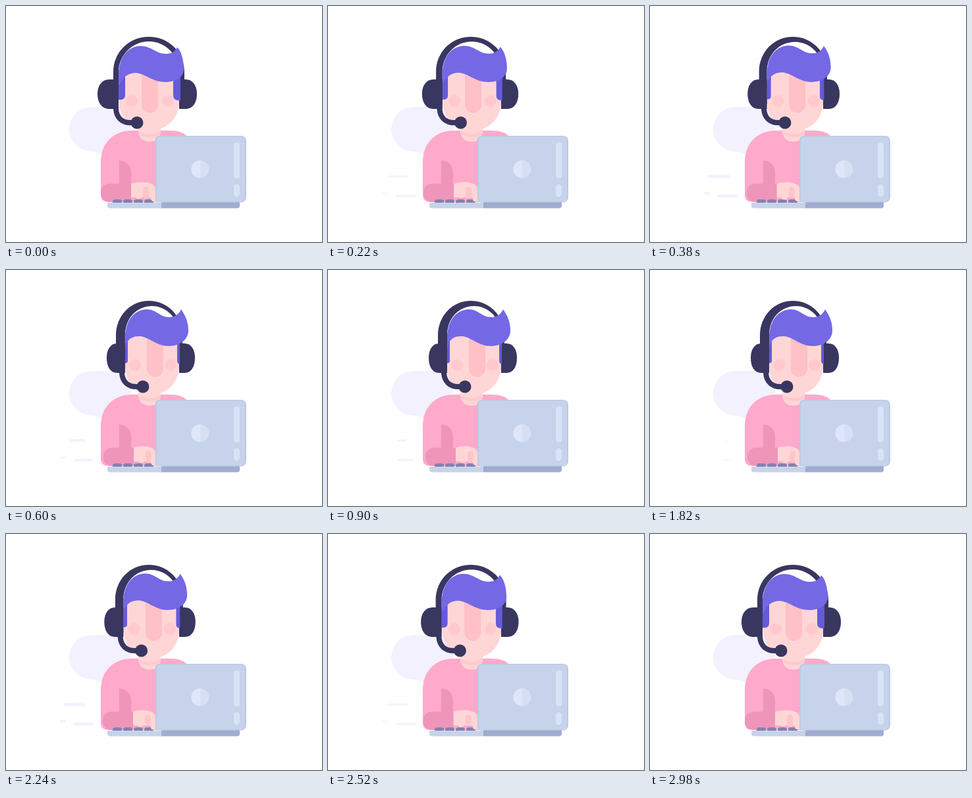
An HTML page with a canvas that plays this animation: 480x360 px, repeating every 3 s.

```html
<!DOCTYPE html>
<html lang="en">
<head>
<meta charset="utf-8">
<title>Support agent</title>
<style>
  html, body { margin: 0; width: 100%; height: 100%; overflow: hidden; background: #fff; }
  canvas { display: block; width: 480px; height: 360px; }
</style>
</head>
<body>
<canvas id="stage" width="480" height="360"></canvas>
<script>
const ctx = document.getElementById('stage').getContext('2d');
const LOOP = 3000;
const NAVY = '#393660', HAIR = '#7468e4', BURN = '#655ad8', SKIN = '#ffd6d6', BLUSH = '#ffc0c6',
  PINK = '#ffa9cb', CUFF = '#ee95b9', LID = '#c7d3ea', SHINE = '#d8e3f5', CLOUD = '#f3f1fe';

// Streaks: time, upper left/right, lower left/right, thickness, size of the extra dash
const STREAKS = [
  [0, 92, 121, 104, 133, 0, 0],
  [380, 88, 122, 102, 134, 5, 1],
  [900, 106, 119, 106, 130, 3, 0],
  [1320, 92, 122, 103, 131, 4, 0],
  [1820, 112, 118, 112, 124, 1, 0],
  [2240, 88, 121, 103, 133, 5, 1],
  [3000, 92, 121, 104, 133, 0, 0]
];

let turn = 0;

const ease = x => (1 - Math.cos(Math.PI * Math.min(1, Math.max(0, x)))) / 2;
const mix = (a, b, k = turn) => a + (b - a) * k;

// Blend two paths that share the same commands
function blend(from, to) {
  const ends = to.match(/\d+/g);
  let i = 0;
  return from.replace(/\d+/g, n => mix(+n, +ends[i++]).toFixed(2));
}

function fill(color, path, to) {
  ctx.fillStyle = color;
  ctx.fill(new Path2D(to ? blend(path, to) : path));
}

function box(color, x, y, w, h, r = 0) {
  ctx.fillStyle = color;
  ctx.beginPath();
  ctx.roundRect(x, y, w, h, r);
  ctx.fill();
}

function disc(color, x, y, r) {
  ctx.fillStyle = color;
  ctx.beginPath();
  ctx.arc(x, y, r, 0, 7);
  ctx.fill();
}

function drawClouds() {
  fill(CLOUD, 'M130 154H190V226H145C139 225 136 222 130 222A34 34 0 0 1 130 154Z');
  fill(CLOUD, 'M284 154H326A9 9 0 0 1 326 172H314A10 10 0 0 0 314 193H366A29 29 0 0 1 370 251V265H400A14 14 0 0 1 400 293H340V215H290C270 200 260 190 260 172C260 158 266 154 284 154Z',
    'M284 154H326A9 9 0 0 1 326 172H314A10 10 0 0 0 314 193H366A29 29 0 0 1 370 251V265H400A14 14 0 0 1 400 293H340V215H290C272 200 265 190 266 172C267 158 273 154 284 154Z');
}

function dash(x1, x2, y, h) {
  if (h > 0.1) box(CLOUD, x1, y - h / 2, x2 - x1, h, h / 2);
}

function drawStreaks(t) {
  const i = STREAKS.findIndex(s => s[0] > t);
  const a = STREAKS[i - 1], b = STREAKS[i];
  const k = (t - a[0]) / (b[0] - a[0]);
  const [, l1, r1, l2, r2, h, extra] = a.map((v, j) => mix(v, b[j], k));
  dash(l1, r1, 260, h);
  dash(l2, r2, 290, h);
  dash(82, 91, 286, extra * 5);
}

function drawBody() {
  fill(PINK, 'M144 288V238C144 208 164 190 192 190H248C262 190 270 193 276 200V299H156Q144 299 144 288Z');
  fill(SKIN, 'M201 180V193C203 203 209 207 218 207C228 207 233 203 235 193V180Z');
  fill('#ffc9cf', 'M202 191Q218 200 234 191L233 197Q218 203 203 197Z');
  fill(CUFF, 'M172 236C184 236 190 244 190 256V272H172Z');
}

function drawHead() {
  fill(NAVY, 'M163 150V101C163 70 187 47 217 47C247 47 271 70 271 101V150H263V101C263 75 242 54 217 54C192 54 171 75 171 101V150Z',
    'M167 150V100C167 70 189 47 217 47C245 47 268 70 268 100V150H263V100C263 74 244 55 222 55C198 55 181 74 181 100V150Z');
  fill(NAVY, 'M263 112H273C283 112 290 121 290 134C290 148 283 157 273 157H263Z',
    'M263 112H271C281 112 287 121 287 134C287 148 281 157 271 157H263Z');
  fill(SKIN, 'M172 95V146C172 172 192 190 217 190C244 190 263 172 263 146V95Z',
    'M181 95V146C181 172 198 190 221 190C245 190 263 172 263 146V95Z');
  box(BLUSH, mix(206, 214), 92, 25, 71, [0, 0, 12.5, 12.5]);
  disc('#ffc9cd', mix(191, 196), 145, 9);
  disc('#ffc9cd', mix(246, 250), 145, 9);
  fill(BURN, 'M171 98H181V136Q181 143 174 143H171Z', 'M181 98H185V138Q185 142 182 142H181Z');
  fill(BURN, 'M265 98H254V136Q254 144 262 144H265Z', 'M264 98H260V138Q260 143 263 143H264Z');
  fill(HAIR, 'M171 122V104C172 78 184 62 204 61C221 61 228 73 243 73C252 73 257 69 260 63C266 68 270 82 270 96C270 110 256 116 242 116C222 116 212 103 197 102C186 102 178 108 172 120Z',
    'M181 119V100C183 76 194 61 214 60C228 60 234 72 248 72C257 72 263 67 266 60C273 70 277 80 277 92C277 108 262 116 247 116C228 116 218 102 203 101C193 101 187 104 183 112Z');
  fill(NAVY, 'M171 112H157C146 112 139 121 139 134C139 148 146 157 157 157H171Z',
    'M181 112H169C159 112 153 121 153 134C153 148 159 157 169 157H181Z');
  ctx.strokeStyle = NAVY;
  ctx.lineWidth = 8;
  ctx.stroke(new Path2D(blend('M167 150V157C168 171 177 178 189 178H199', 'M176 150V157C177 171 186 178 198 178H208')));
  disc(NAVY, mix(199, 208), 178, 9.5);
}

function drawLaptop(t) {
  const x = mix(190, 194);
  const tap = phase => 1.5 * Math.sin(t / 300 * 2 * Math.PI + phase);
  box(CUFF, x - 46, 271, 46, 28, [13, 0, 0, 13]);
  for (const left of [162, 178, 194, 210]) box('#8381ad', left, 295, 14, 6, [4, 4, 0, 0]);
  fill(SKIN, `M${x} 271Q206 267 218 270Q229 273 229 286V298H222V292H${x}Z`);
  box(SKIN, x + 7, 284, 9, 10 + tap(0), 4);
  box('#ffc5c9', x + 18, 276, 9, 17 + tap(2), 4.5);
  box(SKIN, 220, 284, 9, 14 + tap(4) / 2, 4);
  box(LID, 154, 300, 84, 8.5, [2, 0, 0, 4]);
  box('#a1adcf', 236, 299, 119, 9.5, [0, 0, 4, 0]);
  box('#bccae3', 227, 198, 138, 101.5, [6, 8, 8, 4]);
  box(LID, 229, 199.5, 134, 99, [5, 7, 7, 4]);
  box(SHINE, 346, 208, 9, 55, 4.5);
  box(SHINE, 346, 272, 9, 19, 4.5);
  disc('#d6e0f5', 295, 249, 13.5);
  fill('#e0e6fa', 'M295 235.5A13.5 13.5 0 0 0 295 262.5Z');
}

function frame(now) {
  const t = now % LOOP;
  turn = ease(t / 630) - ease((t - 2000) / 700);
  ctx.clearRect(0, 0, 480, 360);
  drawClouds();
  drawStreaks(t);
  drawBody();
  drawHead();
  drawLaptop(t);
  requestAnimationFrame(() => frame(performance.now() - start));
}

const start = performance.now();
frame(0);
</script>
</body>
</html>
```
